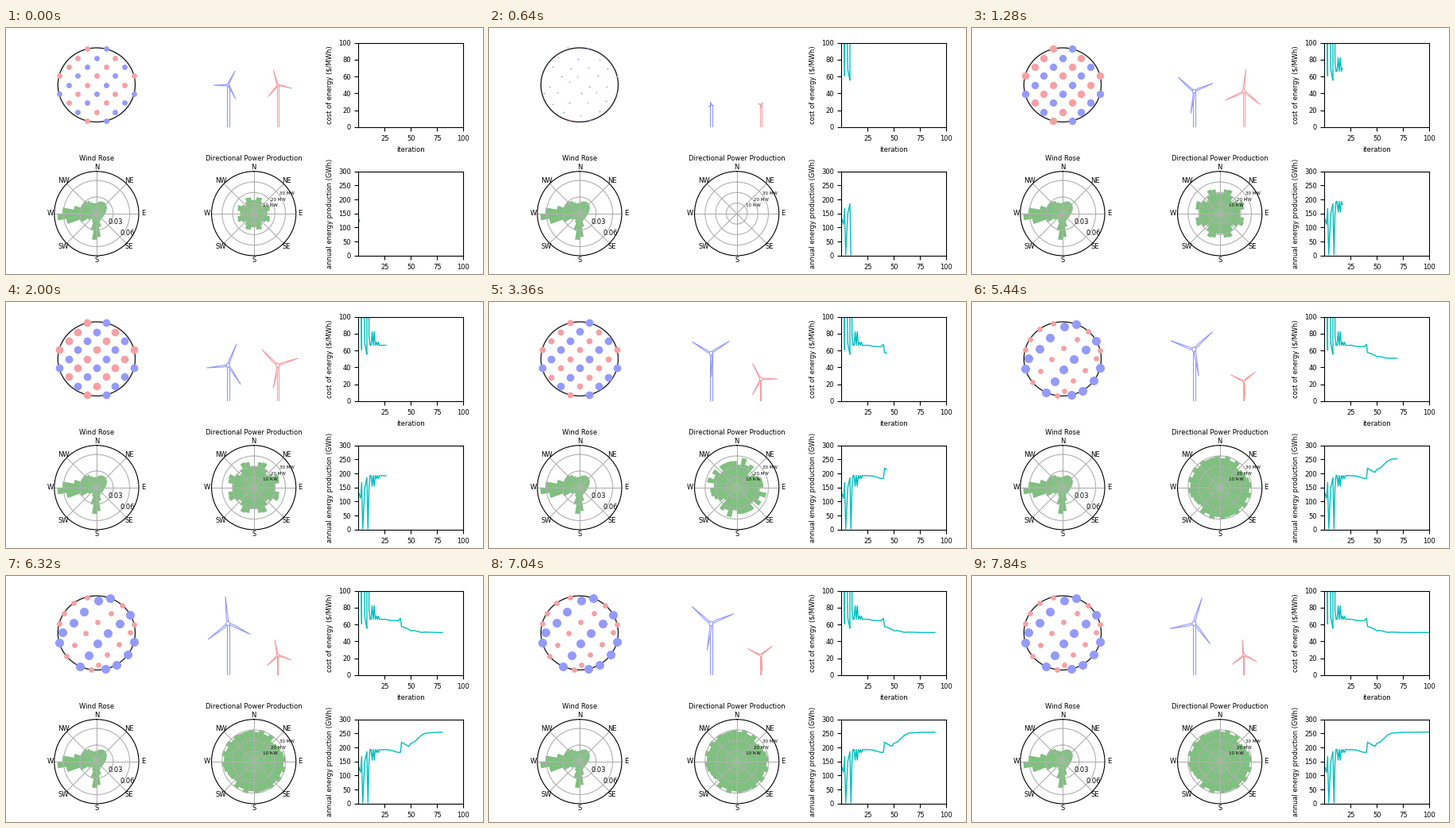
A matplotlib script for the animation above (7.92 s loop, 600 by 310 pixels).

```python
import numpy as np
import matplotlib.pyplot as plt
from matplotlib.animation import FuncAnimation
from matplotlib.patches import Circle, Ellipse, Polygon

W, H, DPI = 600, 310, 100
FRAMES, STEP = 99, 80
BLUE, RED = "#949aff", "#f6a0a4"
PX = 72 / DPI  # points per pixel

plt.rcParams.update({"font.family": "DejaVu Sans", "font.size": 6})
fig = plt.figure(figsize=(W / DPI, H / DPI), dpi=DPI, facecolor="white")

COLS, ROWS = (47.9, 245.65, 443.4), (18.6, 180.7)
AW, AH = 132, 106.2


def panel(col, row, **kw):
    x, y = COLS[col], ROWS[row]
    return fig.add_axes([x / W, 1 - (y + AH) / H, AW / W, AH / H], **kw)


def knots(*pairs):
    xs, ys = zip(*pairs)
    return np.interp(np.arange(101), xs, ys)


# Optimiser history: wild first probes, a ringing line search, steady gains
aep = knots((0, 133), (2, 112), (3, 168), (4, 3), (6, 150), (8, 185), (9, 3),
            (10, 150), (11, 193), (26, 192), (30, 191), (38, 182), (40, 183),
            (41, 219), (43, 214), (48, 204), (50, 215), (53, 219), (60, 244),
            (64, 251), (75, 254), (100, 255))
aep[[13, 15]] = 155
aep[[17, 19]] = 182
spending = knots((0, 20000), (2, 18000), (3, 10200), (9, 10300), (11, 12750),
                 (26, 12700), (38, 11740), (41, 12600), (48, 11050), (57, 12020),
                 (64, 12800), (100, 12850))
cost = spending / aep


def chart(row, label, top, step):
    ax = panel(2, row)
    ax.set(xlim=(0, 100), ylim=(0, top), xticks=[25, 50, 75, 100],
           yticks=range(0, top + 1, step))
    ax.set_ylabel(label)
    line, = ax.plot([], [], color="c", lw=1)
    return ax, line


cost_ax, cost_line = chart(0, "cost of energy (\\$/MWh)", 100, 20)
cost_ax.set_xlabel("iteration")
aep_ax, aep_line = chart(1, "annual energy production (GWh)", 300, 50)

# Polar panels
BINS = np.arange(5, 360, 10)
THETA = np.radians(BINS)


def lobe(center, width, period=360):
    away = (BINS - center + period / 2) % period - period / 2
    return np.exp(-(away / width) ** 2)


def rose(col, title, values, rmax, rticks, rlabels, rangle, size):
    ax = panel(col, 1, projection="polar")
    ax.set_theta_zero_location("N")
    ax.set_theta_direction(-1)
    bars = ax.bar(THETA, values, width=np.radians(10), color="g", alpha=0.5)
    ax.set_rlim(0, rmax)
    ax.set_rgrids(rticks, rlabels, fontsize=size)
    ax.set_rlabel_position(rangle)
    ax.set_xticks(np.radians(np.arange(0, 360, 45)), [""] * 8)
    for k, name in enumerate(["N", "NE", "E", "SE", "S", "SW", "W", "NW"]):
        ax.text(k * np.pi / 4, rmax * 1.1, name, ha="center", va="center")
    ax.set_title(title, fontsize=6, y=1, pad=9.8)
    return bars


wind = (0.013 + 0.0575 * lobe(266, 20) + 0.036 * lobe(182, 16)
        + 0.017 * lobe(312, 25) + 0.0115 * lobe(35, 45))
rose(0, "Wind Rose", wind, 0.0764, [0.03, 0.06], ["0.03", "0.06"], 135, 6)
power_bars = rose(1, "Directional Power Production", 0 * wind, 40,
                  [10, 20, 30], ["10 MW", "20 MW", "30 MW"], 55, 4)

# Wake losses: lattice rows, then one diagonal and a fine ripple
lattice_wake = 1.1 * np.cos(4 * THETA) - 3.8 * np.cos(8 * THETA)
diagonal_wake = lobe(52, 15, period=180)
ripple = np.cos(16 * (THETA - np.radians(81)))
lattice_amp = knots((28, 1), (42, 0.4), (56, 0))
diagonal_amp = knots((28, 0), (42, 5.3), (56, 6), (70, 3.8))
ripple_amp = knots((28, 0), (42, 3), (56, 2.6), (70, 1.5))


def power(i):
    return (aep[i + 1] * (0.1157 + lattice_amp[i] * lattice_wake / 193)
            - diagonal_amp[i] * diagonal_wake + ripple_amp[i] * ripple)


# Wind farm
farm = panel(0, 0)
farm.set(xlim=(-AW / 2, AW / 2), ylim=(AH / 2, -AH / 2))
farm.axis("off")
RX, RY = 48.6, 46.7
farm.add_patch(Ellipse((0, 0), 2 * RX, 2 * RY, fill=False, ec="#222222", lw=1))

base, is_blue = [], []
for row, first in zip(range(-4, 5), "RRRRBBRBR"):
    cols = [c for c in range(-4, 5) if (c + row) % 2 and c * c + row * row <= 17]
    for n, c in enumerate(cols):
        base.append((c, row))
        is_blue.append((n % 2 == 0) == (first == "B"))
base, is_blue = np.array(base) / 17 ** 0.5, np.array(is_blue)

# The optimum pushes turbines outwards and slides them along the rim
rad = np.hypot(*base.T)
phi = np.arctan2(base[:, 0], -base[:, 1])
phi_end = phi + 0.073 * np.sin(phi + 0.72) + 0.067 * np.sin(3 * phi)
rad_end = np.minimum(1.2 * rad, 1)
best = np.column_stack([rad_end * np.sin(phi_end), -rad_end * np.cos(phi_end)])
progress = knots((40, 0), (56, 0.5), (68, 1))


def layout(i):
    pos = (base + progress[i] * (best - base)) * (RX, RY)
    if 0 < i < 10:
        noise = np.random.default_rng(i).normal(0, 1.6, base.shape)
        pos += noise * max(0, 1 - aep[i + 1] / 193)
    return pos


# Side view of the two turbine types
side = panel(1, 0)
STRETCH = 1.1
side.set(xlim=(-33.6, AW - 33.6), ylim=(0, AH / STRETCH))
side.axis("off")

BLADE = np.array([(0.06, 0.025), (0.22, 0.05), (1, 0), (0.22, -0.02), (0.06, -0.025)])


class Turbine:
    def __init__(self, x, color, phase, speed, hub, limit, width):
        self.x, self.phase, self.speed = x, phase, speed
        self.hub, self.width = hub / STRETCH, width
        self.radius = np.minimum(3 + 0.125 * np.append(aep[1:], aep[-1]), limit)
        self.tower, = side.plot([], [], color=color, lw=0.8, zorder=2)
        style = dict(fc="white", ec=color, lw=0.8)
        self.blades = [side.add_patch(Polygon(BLADE, zorder=3, **style)) for _ in range(3)]
        self.nose = side.add_patch(Circle((x, 0), 1, zorder=4, **style))
        self.dots, = farm.plot([], [], "o", color=color, mew=0, clip_on=False, zorder=3)

    def update(self, i, pos):
        x, y, r, w = self.x, self.hub[i], self.radius[i], self.width[i]
        self.tower.set_data([x - w, x - w, x + w, x + w], [0, y, y, 0])
        for k, blade in enumerate(self.blades):
            a = np.radians(self.phase + self.speed * i + 120 * k)
            rot = np.array([(np.cos(a), np.sin(a)), (-np.sin(a), np.cos(a))])
            blade.set_xy(r * BLADE @ rot + (x, y))
        self.nose.center = x, y
        self.nose.set_radius(0.08 * r)
        self.dots.set_data(*pos.T)
        self.dots.set_markersize((0.33 * r + 0.8) * PX)


early = [(0, 53), (7, 48), (8, 28), (9, 45), (26, 45)]
blue = Turbine(0, BLUE, 61, 5,
               knots(*early, (38, 50), (41, 60), (56, 63), (66, 65)),
               knots((42, 27), (56, 30), (66, 31)),
               knots((0, 1.5)))
red = Turbine(62.6, RED, 107.7, 6,
              knots(*early, (38, 40), (41, 28), (56, 24), (66, 25)),
              knots((26, 27), (38, 25), (42, 21), (56, 16.8), (66, 18)),
              knots((38, 1.3), (42, 0.6)))


def update(i):
    x = np.arange(i + 2)
    cost_line.set_data(x, cost[:i + 2])
    aep_line.set_data(x, aep[:i + 2])
    for bar, value in zip(power_bars, power(i)):
        bar.set_height(value)
    pos = layout(i)
    blue.update(i, pos[is_blue])
    red.update(i, pos[~is_blue])


anim = FuncAnimation(fig, update, frames=FRAMES, interval=STEP, repeat=True,
                     repeat_delay=0, blit=False)
plt.show()
```
